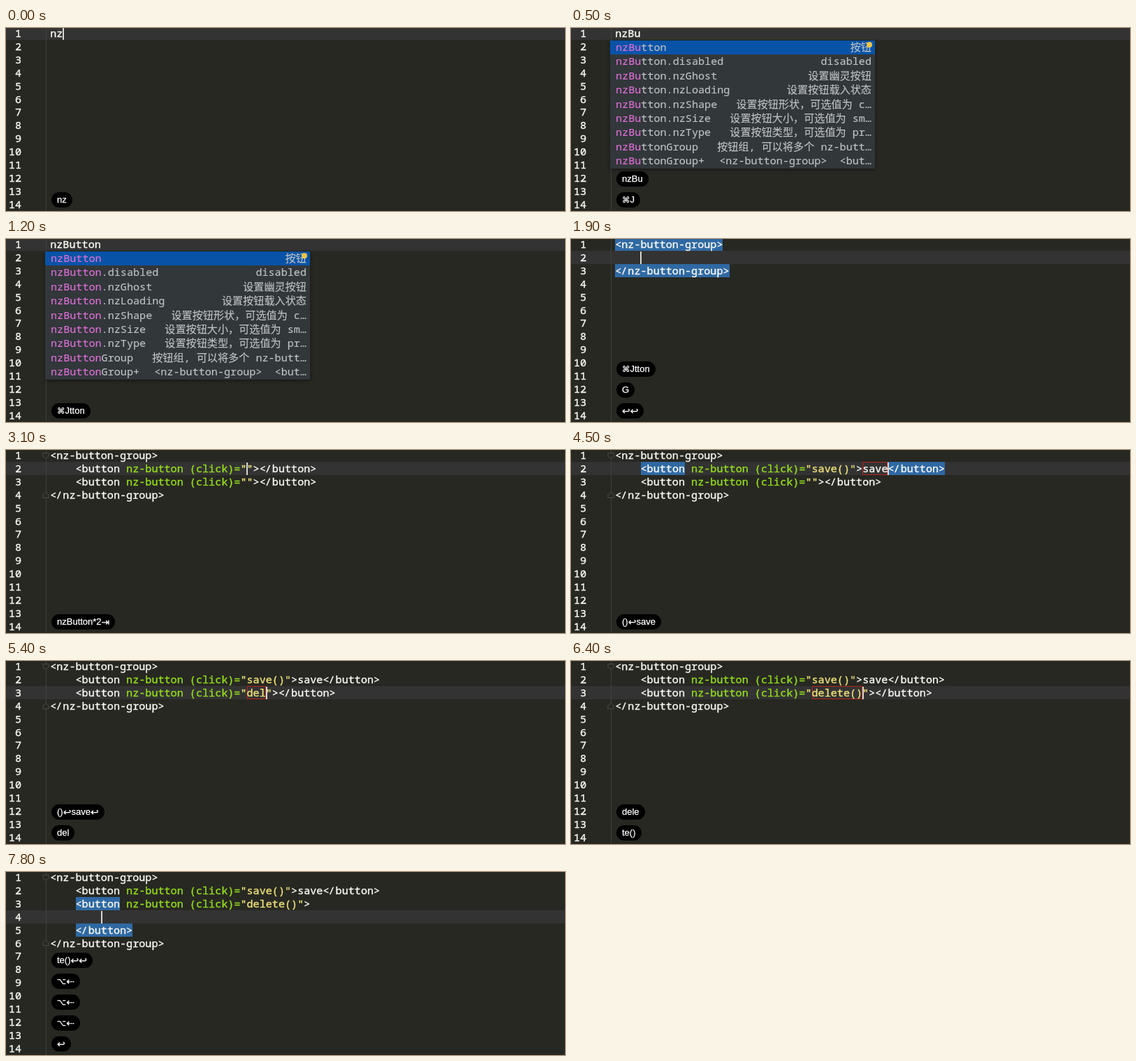
Write an HTML page that moves like this. It is 800 px wide and 263 px high and loops after 8000 ms.

```html
<!DOCTYPE html>
<html lang="en">
<head>
<meta charset="utf-8">
<title>Editor snippets</title>
<style>
  html, body { margin: 0; width: 100%; height: 100%; overflow: hidden; background: #272822; }
  #stage {
    --row: 18.88px;
    position: relative; width: 100%; height: 100%; overflow: hidden;
    font: 500 15.13px/var(--row) 'Noto Sans Mono', 'Noto Sans CJK SC', 'Noto Sans CJK', monospace;
    font-variant-ligatures: none;
    color: #f8f8f2; white-space: pre;
    -webkit-text-stroke: 0.4px;
  }
  #stage > * { position: absolute; }
  #band { left: 0; right: 0; height: var(--row); background: #333333; }
  #guide { left: 57px; top: 0; bottom: 0; width: 1px; background: #40413b; }
  #nums { left: 0; top: -1.8px; width: 22px; text-align: right; }
  #code { left: 63.2px; top: -1.8px; }
  #code div { height: var(--row); }
  #code span { display: inline-block; height: var(--row); vertical-align: top; }
  .hl { background: #2f69a3; }
  .var { box-shadow: inset 0 0 0 1px #b8241c; }
  .attr { color: #94dc1c; }
  .str { color: #ece07a; }
  .slash { position: relative; left: -1px; }
  #caret { width: 2px; height: 18px; background: #d8d8d2; }
  .fold { left: 52px; width: 10px; height: 10px; fill: #272822; stroke: #50514a; }
  #popup {
    left: 56px; top: 18px; background: #32373a; color: #bfc2c4; box-shadow: 0 2px 5px #0006;
    font-weight: 400; -webkit-text-stroke: 0.15px;
  }
  #popup div { display: flex; justify-content: space-between; height: 20.4px; line-height: 19.6px; padding: 0 5px 0 8px; }
  #popup div:first-child { background: #0853a7; }
  #popup b { font-weight: 400; color: #dd70d6; }
  #bulb { position: absolute; right: 4px; top: 2px; width: 8px; height: 8px; border-radius: 50%; background: #f0c544; }
  #pills { left: 65px; bottom: 5px; -webkit-text-stroke: 0.25px; }
  #pills div {
    width: max-content; height: 22px; margin-top: 8px; padding: 0 8px; border-radius: 11px;
    background: #000; color: #fff; font: 13px/22px 'Liberation Sans', Arial, sans-serif;
  }
  #pills i, #pills kbd { font: 14px/22px 'DejaVu Sans', sans-serif; vertical-align: top; }
  #pills kbd { font-size: 11.5px; }
</style>
</head>
<body>
<div id="stage">
  <div id="band"></div>
  <div id="guide"></div>
  <div id="nums"></div>
  <svg id="foldTop" class="fold" viewBox="0 0 11 11"><path d="M1 1.5h9v5L5.5 10 1 6.5z"/></svg>
  <svg id="foldEnd" class="fold" viewBox="0 0 11 11"><path d="M1 9.5h9v-5L5.5 1 1 4.5z"/></svg>
  <div id="code"></div>
  <div id="caret"></div>
  <div id="popup"></div>
  <div id="pills"></div>
</div>
<script>
const LOOP = 8000, ROW = 18.88, GROUP = 'nz-button-group';
const $ = id => document.getElementById(id);

const esc = s => s.replace(/</g, '&lt;');
const span = (cls, html) => `<span class="${cls}">${html}</span>`;
const tag = (s, on) => {
  const html = esc(s).replace('/', span('slash', '/'));
  return on ? span('hl', html) : html;
};

// Completion list
const ITEMS = [
  ['', '按钮'],
  ['.disabled', 'disabled'],
  ['.nzGhost', '设置幽灵按钮'],
  ['.nzLoading', '设置按钮载入状态'],
  ['.nzShape', '设置按钮形状，可选值为 c…'],
  ['.nzSize', '设置按钮大小，可选值为 sm…'],
  ['.nzType', '设置按钮类型，可选值为 pr…'],
  ['Group', '按钮组, 可以将多个 nz-butt…'],
  ['Group+', '<nz-button-group>  <but…']
];
const WIDE = [
  ['Group', '按钮组, 可以将多个 nz-button 放入 nz-button-group 的容器中'],
  ['Group+', '<nz-button-group>  <button nz-button></button></nz-b…']
];
const popupHtml = (list, typed) => list.map(([tail, note]) => {
  const name = 'nzButton' + tail;
  return `<div><span><b>${name.slice(0, typed.length)}</b>${name.slice(typed.length)}</span>` +
    `<span>${esc(note)}</span></div>`;
}).join('') + '<span id="bulb"></span>';

// Timeline: each step patches the state before it
const steps = [];
let state = {
  mode: 'word', word: 'nz', save: '', label: '', del: '',
  row: 0, col: 2, hl: '', active: '', list: null, fold: false, pills: ['nz']
};
const at = (t, patch) => {
  state = { ...state, ...patch };
  steps.push({ t, ...state });
};
// Types into one field; the last pill grows along with it
const type = (t, key, text, gap = 100) => [...text].forEach((ch, i) => {
  const pills = [...state.pills];
  pills.push(pills.pop() + ch);
  at(t + i * gap, { [key]: state[key] + ch, col: state.col + 1, pills });
});
const pill = (...add) => { state.pills = [...state.pills, ...add]; };
const press = key => [...state.pills.slice(0, -1), state.pills.at(-1) + key];

at(0, {});
type(100, 'word', 'Bu');
at(300, { pills: ['nzBu', '⌘J'] });
at(400, { list: ITEMS });
type(600, 'word', 'tton');
at(1000, { pills: ['⌘Jtton'] });
pill('');
state.list = WIDE;
type(1300, 'word', 'G');
at(1500, { mode: 'inline', list: null, col: 17, pills: ['⌘Jtton', 'G', '↩'] });
at(1700, { pills: press('↩') });
at(1900, { mode: 'split', word: '', row: 1, col: 4, hl: 'group' });
state.hl = '';
state.pills = ['G', '↩↩', ''];
type(2100, 'word', 'nz');
state.fold = true;
state.pills = ['↩↩', 'nz'];
type(2300, 'word', 'Butt');
state.pills = ['nzButt'];
type(2700, 'word', 'on*2');
at(3100, { mode: 'buttons', col: 31, active: 'save', pills: press('⇥') });
pill('');
type(3200, 'save', 'save');
at(3600, { pills: ['save'] });
pill('');
type(3700, 'save', '()');
at(3900, { col: 39, active: 'label', pills: press('↩') });
state.hl = 'first';
type(4000, 'label', 'save');
at(4400, { pills: state.pills.slice(-1) });
at(4800, { row: 2, col: 31, active: 'del', hl: '', pills: press('↩') });
pill('');
type(5200, 'del', 'd');
type(5400, 'del', 'el', 0);
state.pills = ['del'];
type(5600, 'del', 'e');
pill('');
type(5800, 'del', 'te()');
at(6600, { active: '', col: 41, pills: press('↩') });
at(6800, { hl: 'second', pills: state.pills.slice(-1) });
at(7000, { col: 50, pills: press('↩') });
const jump = '⌥⇠';
pill(jump);
at(7200, {});
pill(jump);
at(7400, { col: 43 });
pill(jump);
at(7600, { col: 41 });
pill('↩');
at(7800, { mode: 'broken', row: 3, col: 8 });

function button(s, key, label, on) {
  const value = s.active === key && s[key] ? span('var', s[key]) : s[key];
  const text = label && s.active === 'label' ? span('var', label) : label;
  return '    ' + tag('<button', on) + ' ' + span('attr', 'nz-button (click)=') +
    span('str', `"${value}"`) + '>' + text;
}

function lines(s) {
  const on = s.hl === 'group', second = s.hl === 'second';
  const open = tag(`<${GROUP}>`, on), close = tag(`</${GROUP}>`, on);
  if (s.mode === 'word') return [s.word];
  if (s.mode === 'inline') return [open + close];
  if (s.mode === 'split') return [open, '    ' + s.word, close];
  const first = button(s, 'save', s.label, s.hl === 'first') + tag('</button>', s.hl === 'first');
  const next = button(s, 'del', '', second), end = tag('</button>', second);
  return s.mode === 'broken'
    ? [open, first, next, '', '    ' + end, close]
    : [open, first, next + end, close];
}

function render(s) {
  const rows = lines(s), top = s.row * ROW;
  $('code').innerHTML = rows.map(r => `<div>${r}</div>`).join('');
  $('band').style.top = top - 1.7 + 'px';
  $('caret').style.cssText =
    `left:calc(63px + ${s.col}ch);top:${top - 1}px;display:${s.list ? 'none' : 'block'}`;
  for (const id of ['foldTop', 'foldEnd']) $(id).style.display = s.fold ? 'block' : 'none';
  $('foldTop').style.top = '3px';
  $('foldEnd').style.top = (rows.length - 1) * ROW + 3 + 'px';
  $('popup').style.display = s.list ? 'block' : 'none';
  if (s.list) {
    $('popup').style.width = s.list === WIDE ? '634px' : '379px';
    $('popup').innerHTML = popupHtml(s.list, s.word);
  }
  $('pills').innerHTML = s.pills.map(p => {
    const html = p.replace(/[⇠↩⇥]/g, '<i>$&</i>').replace(/[⌘⌥]/g, '<kbd>$&</kbd>');
    return `<div>${html}</div>`;
  }).join('');
}

$('nums').textContent = Array.from({ length: 14 }, (_, i) => i + 1).join('\n');

let shown = null;
const start = performance.now();
function frame(now) {
  const t = Math.max(0, now - start) % LOOP;
  const s = steps.findLast(step => step.t <= t);
  if (s !== shown) render(shown = s);
  requestAnimationFrame(frame);
}
frame(start);
</script>
</body>
</html>
```
